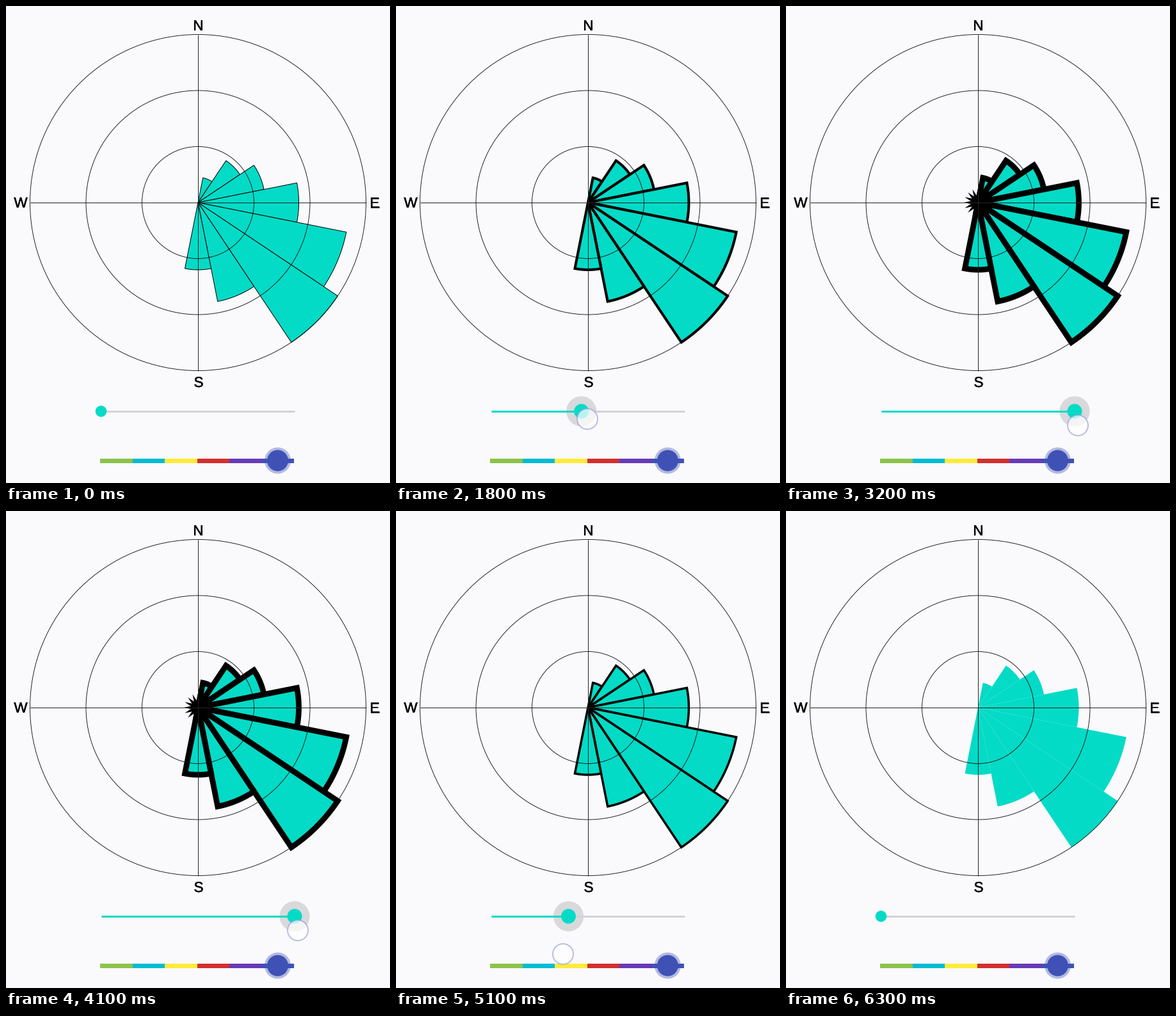
A matplotlib script for the animation above (8000 ms loop, 600 by 745 pixels).

```python
import numpy as np
import matplotlib.pyplot as plt
from matplotlib.animation import FuncAnimation
from matplotlib.patches import Circle, Polygon, Rectangle
from matplotlib.patheffects import Normal, Stroke

W, H, DPI = 600, 745, 100
STEP, FRAMES = 100, 80
PX = 72 / DPI  # points per pixel

BG, TEAL, INK = "#faf9fc", "#03dbc6", "#000000"
CX, CY, R = 300, 307, 262.5
SHARES = [0.15, 0.3, 0.4, 0.6, 0.9, 1.0, 0.6, 0.4]  # NNE round to S

TRACK_X0, TRACK_X1, TRACK_Y = 148.5, 451, 633
LEVELS = 15
LEVEL_PX = 1.75 / 3  # outline pixels per slider level

# Finger path: time in ms, x, y
PATH = np.array([
    (500, 150, 633), (700, 152, 633), (1300, 234, 637), (1800, 299, 645),
    (2600, 390, 653), (3200, 456, 655), (4100, 456, 655), (4500, 372, 690),
    (4800, 305, 703), (5100, 261, 692), (5500, 190, 715), (5800, 139, 735),
    (6000, 86, 735), (6200, 200, 738),
])
TOUCH_DOWN, TOUCH_UP, TOUCH_GONE = 500, 6000, 6300

fig = plt.figure(figsize=(W / DPI, H / DPI), dpi=DPI, facecolor=BG)
ax = fig.add_axes([0, 0, 1, 1])
ax.set_xlim(0, W)
ax.set_ylim(H, 0)
ax.axis("off")


def disc(x, y, r, z, **style):
    return ax.add_patch(Circle((x, y), r, zorder=z, **style))


def line(xs, ys, color, width, z):
    return ax.plot(xs, ys, color=color, lw=width * PX, zorder=z,
                   solid_capstyle="butt")[0]


def sector(index, share):
    mid = np.radians(22.5 * (index + 1))
    a = np.linspace(mid - np.pi / 16, mid + np.pi / 16, 40)
    xs = CX + share * R * np.sin(a)
    ys = CY - share * R * np.cos(a)
    points = np.vstack([(CX, CY), np.column_stack([xs, ys])])
    return ax.add_patch(Polygon(points, closed=True, fc=TEAL, ec=INK,
                                joinstyle="miter", zorder=2))


def letter(x, baseline, char):
    ax.text(x, baseline, char, family="Liberation Sans", fontsize=22.5 * PX,
            color=INK, ha="center", va="baseline", zorder=4,
            path_effects=[Stroke(linewidth=0.5 * PX, foreground=INK), Normal()])


# Wind rose
sectors = [sector(i, s) for i, s in enumerate(SHARES)]
for k in (1, 2, 3):
    disc(CX, CY, R * k / 3, 3, fill=False, ec="#111111", lw=0.9 * PX)
line([CX, CX], [CY - R, CY + R], "#222222", 1, 3)
line([CX - R, CX + R], [CY, CY], "#222222", 1, 3)
for x, baseline, char in [(300.5, 38, "N"), (576, 314.5, "E"),
                          (301, 595, "S"), (23, 314.5, "W")]:
    letter(x, baseline, char)

# Width slider
halo = disc(TRACK_X0, TRACK_Y, 23.5, 4, fc="#d9d8dc", ec="none")
line([TRACK_X0, TRACK_X1], [TRACK_Y] * 2, "#d3d2d6", 3, 5)
active = line([TRACK_X0, TRACK_X0], [TRACK_Y] * 2, TEAL, 3, 6)
thumb = disc(TRACK_X0, TRACK_Y, 8.75, 7, fc=TEAL, ec="none")

# Colour slider
BAR = ["#8bc34a", "#00bcd4", "#ffeb3b", "#d32f2f", "#673ab7", "#3f51b5"]
for i, color in enumerate(BAR):
    ax.add_patch(Rectangle((147 + 50.5 * i, 706.5), 50.5, 7.5, fc=color,
                           ec="none", zorder=5))
disc(424.5, 710, 20.5, 6, fc="#3f51b5", ec="none", alpha=0.38)
disc(424.5, 710, 16.5, 7, fc="#3f51b5", ec="none")

touch = disc(0, 0, 16, 9, fc=(1, 1, 1, 0.72), ec=(0.6, 0.62, 0.85, 0.65),
             lw=2 * PX)


def finger(t):
    return [np.interp(t, PATH[:, 0], PATH[:, k]) for k in (1, 2)]


def level(t):
    if not TOUCH_DOWN <= t < TOUCH_UP:
        return 0
    x, _ = finger(t)
    share = (x - TRACK_X0) / (TRACK_X1 - TRACK_X0)
    return int(np.clip(round(share * LEVELS), 0, LEVELS))


def press(t):
    return np.interp(t, [TOUCH_DOWN - 100, TOUCH_DOWN + 100,
                         TOUCH_UP, TOUCH_GONE], [0, 1, 1, 0])


def update(frame):
    t = frame * STEP
    value, held = level(t), press(t)

    # The outline keeps its one-pixel default until the slider first moves.
    untouched = value == 0 and t < 1300
    width = 1 if untouched else value * LEVEL_PX
    for s in sectors:
        s.set_linewidth(width * PX)
        s.set_edgecolor(INK if width else "none")

    x = TRACK_X0 + value * (TRACK_X1 - TRACK_X0) / LEVELS
    active.set_xdata([TRACK_X0, x])
    thumb.center = halo.center = (x, TRACK_Y)
    thumb.set_radius(8.75 + 2.75 * held)
    halo.set_alpha(held)

    touch.center = finger(t)
    touch.set_visible(TOUCH_DOWN <= t < TOUCH_GONE)
    return [*sectors, active, thumb, halo, touch]


anim = FuncAnimation(fig, update, frames=FRAMES, interval=STEP,
                     repeat=True, repeat_delay=0, blit=False)
plt.show()
```
